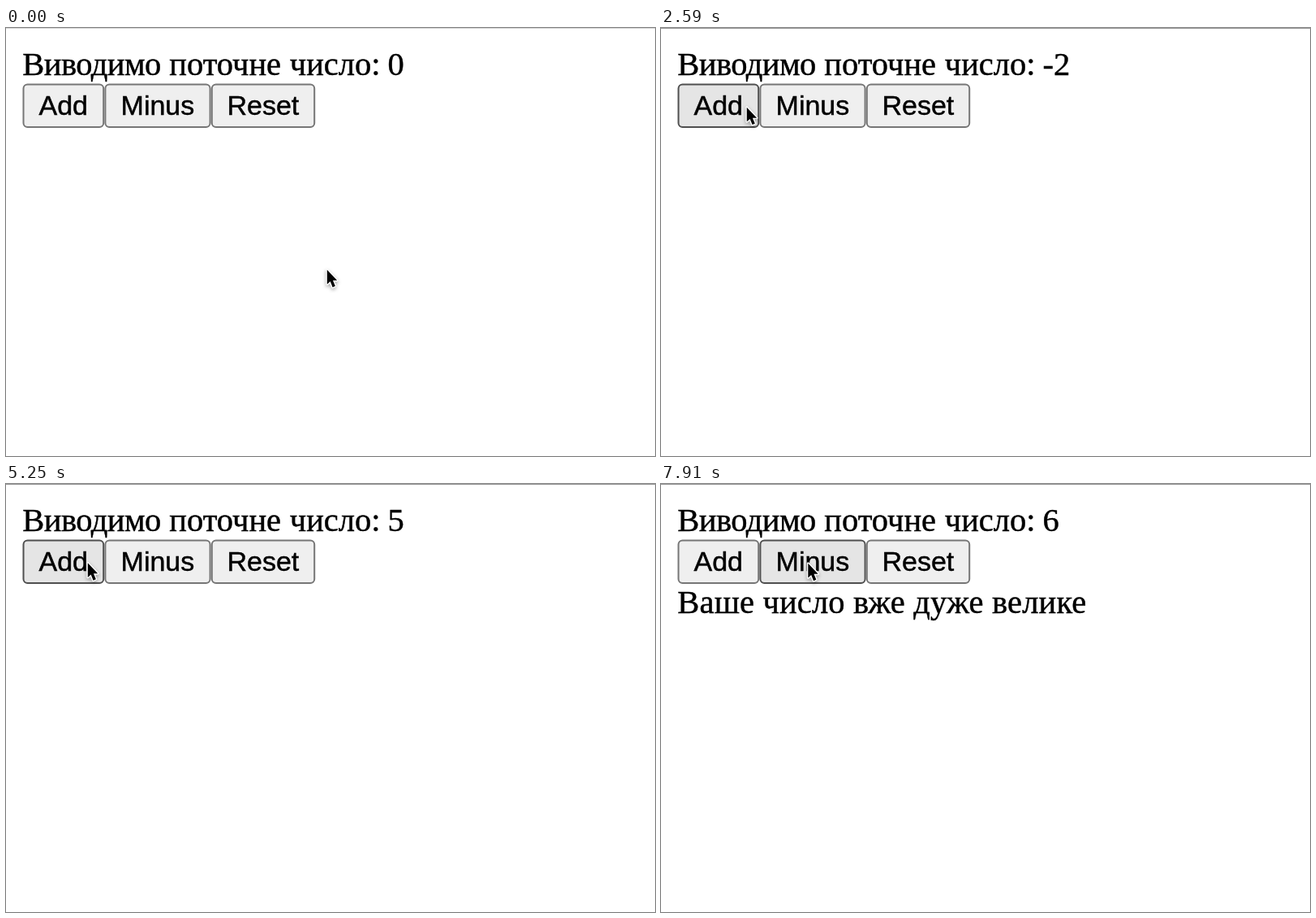
Animation, 800 px wide and 527 px high, one loop 8000 ms. Source, as an HTML page with a canvas:

```html
<!DOCTYPE html>
<html lang="uk">
<head>
<meta charset="utf-8">
<style>
html, body { margin: 0; width: 100%; height: 100%; overflow: hidden; background: #fff; }
canvas { display: block; }
</style>
</head>
<body>
<canvas id="stage" width="800" height="527"></canvas>
<script>
const ctx = document.getElementById('stage').getContext('2d');
const LOOP = 8000, STEP = 70, HOLD = 130, GLIDE = 280;
const SERIF = '40.5px "Liberation Serif", "Times New Roman", serif';
const SANS = '34px "Liberation Sans", Arial, sans-serif';

const buttons = [
  { label: 'Add', x: 20.3, w: 100.9 },
  { label: 'Minus', x: 121.2, w: 131.4 },
  { label: 'Reset', x: 252.6, w: 128.6 }
];

// Runs of clicks: each changes the number by delta when released.
const runs = [
  { at: 1480, every: 280, times: 2, delta: -1 },
  { at: 2650, every: 300, times: 5, delta: 1 },
  { at: 4200, every: 490, times: 2, delta: 1 },
  { at: 5460, every: 0, times: 1, delta: 1 },
  { at: 6800, every: 0, times: 1, delta: -1 },
  { at: 7490, every: 0, times: 1, delta: 1 }
];

// The pointer glides to each place, then rests.
const rest = { x: 395, y: 297 };
const moves = [
  { at: 980, x: 179.5, y: 102 },
  { at: 2380, x: 100, y: 96.5 },
  { at: 6510, x: 180.5, y: 97 },
  { at: 7210, x: 99.5, y: 97 },
  { at: 7630, x: 180.5, y: 97 }
];

const clamp = v => Math.min(1, Math.max(0, v));

function pointerAt(t) {
  return moves.reduce((p, m) => {
    const k = 1 - (1 - clamp((t - m.at) / GLIDE)) ** 2;
    return { x: p.x + (m.x - p.x) * k, y: p.y + (m.y - p.y) * k };
  }, rest);
}

function clicksAt(t) {
  let count = 0, down = false;
  for (const { at, every, times, delta } of runs) {
    for (let i = 0; i < times; i++) {
      const age = t - at - i * every;
      if (age >= HOLD) count += delta;
      else if (age >= 0) down = true;
    }
  }
  return { count, down };
}

// A hairline outline gives the slightly heavy look of smoothed type.
function text(str, x, y, spacing = 0) {
  ctx.letterSpacing = spacing + 'px';
  ctx.fillStyle = ctx.strokeStyle = '#000';
  ctx.lineWidth = 0.45;
  ctx.fillText(str, x, y);
  ctx.strokeText(str, x, y);
}

function drawButton({ label, x, w }, hover, pressed) {
  const [fill, edge] = pressed ? ['#f5f5f5', '#8d8d8d']
    : hover ? ['#e5e5e5', '#4f4f4f'] : ['#efefef', '#767676'];
  ctx.beginPath();
  ctx.roundRect(x + 1.2, 69.5, w - 2.2, 52.5, 5);
  ctx.fillStyle = fill;
  ctx.fill();
  ctx.strokeStyle = edge;
  ctx.lineWidth = 2;
  ctx.stroke();
  ctx.font = SANS;
  ctx.textAlign = 'center';
  text(label, x + w / 2, 107.3);
}

const arrow = new Path2D('M0 0V19L4.2 15.4 7.3 23 10.8 21.5 7.7 14H13.3Z');

function drawPointer({ x, y }) {
  ctx.save();
  ctx.translate(x + 0.8, y + 0.8);
  ctx.scale(0.93, 0.93);
  ctx.lineJoin = 'round';
  ctx.strokeStyle = '#fff';
  ctx.lineWidth = 3;
  ctx.shadowColor = 'rgba(0,0,0,.35)';
  ctx.shadowBlur = 4;
  ctx.shadowOffsetY = 2;
  ctx.stroke(arrow);
  ctx.shadowColor = 'transparent';
  ctx.fillStyle = '#000';
  ctx.fill(arrow);
  ctx.restore();
}

function draw(now) {
  const t = Math.floor((now % LOOP) / STEP) * STEP;
  const p = pointerAt(t);
  const { count, down } = clicksAt(t);

  ctx.fillStyle = '#fff';
  ctx.fillRect(0, 0, 800, 527);
  const grey = 217 - 64 * clamp((t - 210) / 210);
  ctx.fillStyle = `rgb(${grey},${grey},${grey})`;
  ctx.fillRect(0, 0, 800, 1);

  ctx.font = SERIF;
  ctx.textAlign = 'left';
  text('Виводимо', 20.3, 58, -0.55);
  text('поточне', 201.3, 58);
  text('число:', 349.8, 58);
  text(String(count), 470.6, 58);
  if (count > 5) text('Ваше число вже дуже велике', 20.3, 159, 0.17);

  for (const b of buttons) {
    const hover = p.x >= b.x && p.x < b.x + b.w && p.y > 68 && p.y < 123;
    drawButton(b, hover, hover && down);
  }
  drawPointer(p);
}

const start = performance.now();
(function tick() {
  draw(performance.now() - start);
  requestAnimationFrame(tick);
})();
</script>
</body>
</html>
```
